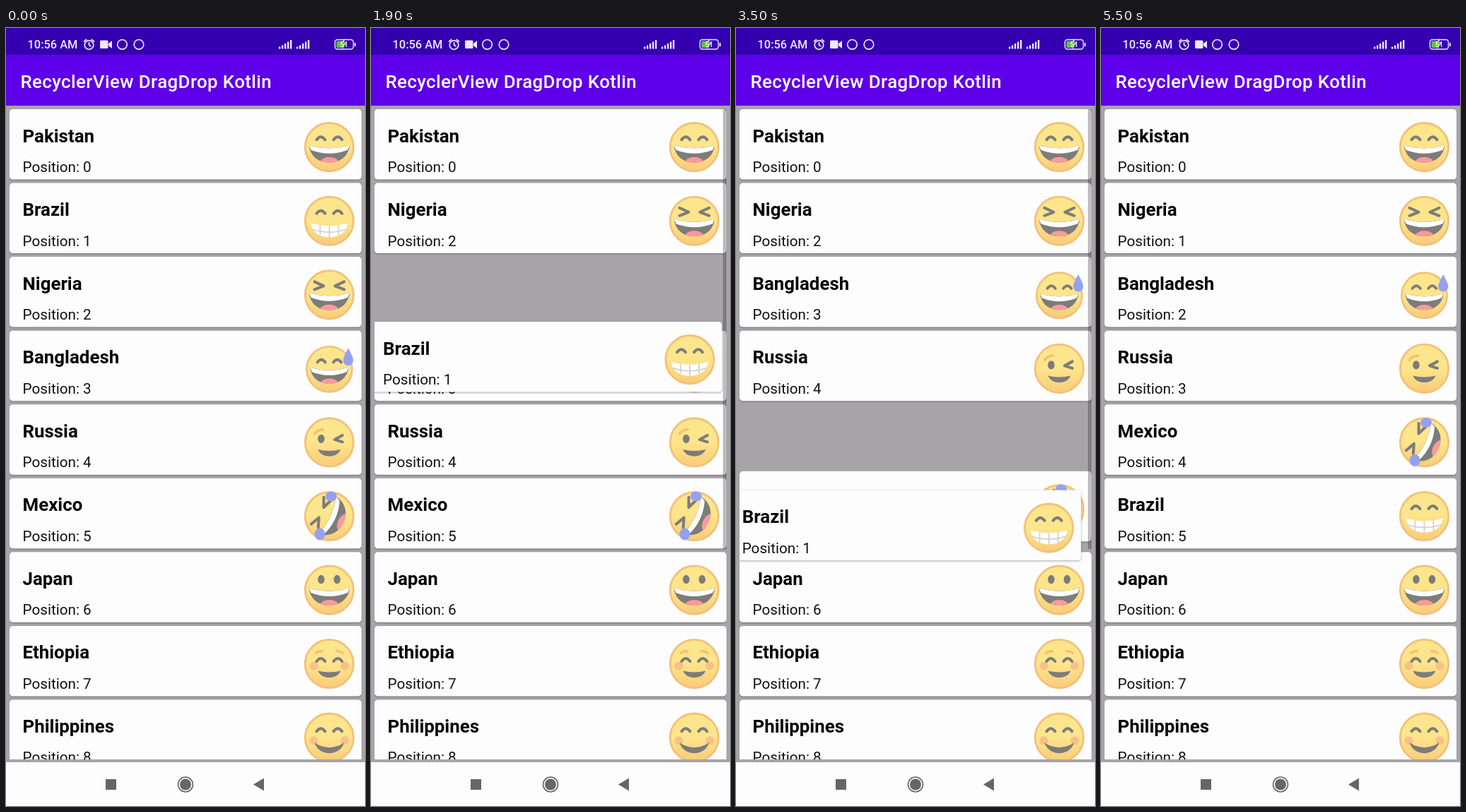
These frames come from a looping animation (508 by 1102 pixels, 5600 ms). An HTML page:

```html
<!DOCTYPE html>
<html lang="en">
<head>
<meta charset="utf-8">
<title>Drag and drop list</title>
<style>
  html, body { margin: 0; width: 100%; height: 100%; overflow: hidden; background: #fefdfe; }
  svg { display: block; width: 100%; height: 100%; font-family: Roboto, "Noto Sans", sans-serif; }
  .bar { font-size: 25.86px; font-weight: 500; letter-spacing: .4px; fill: #fff; }
  .clock { font-size: 16.4px; font-weight: 500; fill: #efe8fa; }
  .name { font-size: 25.86px; font-weight: 700; fill: #050505; }
  .pos { font-size: 20.7px; fill: #111; }
  .card { fill: #fefdfe; filter: drop-shadow(0 1px 1px rgba(0, 0, 0, .3)); }
  .held .card { filter: drop-shadow(0 1.5px 1.5px rgba(0, 0, 0, .35)); }
  .ink { fill: #7d7c7b; }
  .line { fill: none; stroke: #7d7c7b; stroke-width: 4; stroke-linecap: round; stroke-linejoin: round; }
  .brow { fill: none; stroke: #f5bf75; stroke-width: 3.5; stroke-linecap: round; }
  .blush { fill: #f8b48a; opacity: .75; }
  .tear { fill: #93a1f3; }
</style>
</head>
<body>
<svg viewBox="0 0 508 1102" preserveAspectRatio="none">
  <defs>
    <linearGradient id="skin" x2="0" y2="1">
      <stop offset=".5" stop-color="#fde58b"/>
      <stop offset="1" stop-color="#f9cb79"/>
    </linearGradient>
    <clipPath id="list"><rect x="5" y="111" width="498" height="925"/></clipPath>
    <clipPath id="mouth"><path d="M-29-3Q0 6 29-3C27 14 14 22 0 22S-27 14-29-3Z"/></clipPath>

    <circle id="face" r="34.2" fill="url(#skin)" stroke="#f4c07a" stroke-width="2.8"/>
    <g id="laugh" clip-path="url(#mouth)">
      <rect class="ink" x="-30" y="-4" width="60" height="27"/>
      <path d="M-29-3Q0 6 29-3L26 4Q0 14-26 4Z" fill="#fff"/>
      <ellipse cy="21.5" rx="13" ry="7.5" fill="#f99a9c"/>
    </g>
    <path id="happy" class="line" d="M-18-10.5q6-8 12 0M6-10.5q6-8 12 0"/>
    <path id="squint" class="line" d="M-21-18.5L-8-12.5L-21-7.5M21-18.5L8-12.5L21-7.5"/>
    <path id="smirk" class="ink" d="M-16 10Q0 14 16 10C13 17 7 19.5 0 19.5S-13 17-16 10Z"/>
    <path id="drop" class="tear" d="M0-14C3-7 7.5-1 7.5 5a7.5 7.5 0 0 1-15 0C-7.5-1-3-7 0-14Z"/>
  </defs>

  <rect width="508" height="38" fill="#3500b0"/>
  <rect y="38" width="508" height="72" fill="#5e00e9"/>
  <rect y="110" width="508" height="930" fill="#a6a4a7"/>

  <text class="clock" x="30.5" y="29">10:56 AM</text>
  <g fill="none" stroke="#efe8fa" stroke-width="1.7">
    <circle cx="117.5" cy="24" r="6.3"/>
    <path d="M117.5 20v4l3 2M110 19.5l4-3.5M125 19.5l-4-3.5"/>
    <circle cx="164.5" cy="23.3" r="6.8"/>
    <circle cx="188" cy="23.3" r="6.8"/>
    <rect x="465.5" y="16.5" width="26" height="13.5" rx="3.5" stroke-width="1.4"/>
  </g>
  <g fill="#efe8fa">
    <rect x="133" y="17.5" width="11.5" height="11.5" rx="1.5"/>
    <path d="M145 22l5-4v11l-5-4Z"/>
    <path id="signal" d="M386 29.5v-3h2.4v3zM390 29.5v-5h2.4v5zM394 29.5v-7.500h2.400v7.500zM398 29.500v-10h2.400v10zM402 29.500v-12.500h2.400v12.500z"/>
    <use href="#signal" x="25"/>
    <path d="M493 21h1.800v5h-1.800zM478.500 16l-5.500 8h3.600l-1.300 6.500l6-8.500h-3.800l2.200-6Z" transform="translate(0 0)" visibility="hidden"/>
    <rect x="493" y="21" width="1.8" height="5"/>
    <path d="M478.500 15.500l-5 8.500h3.300l-1.300 6.500l6-9h-3.600l1.600-6Z"/>
  </g>
  <rect x="467.500" y="18.500" width="11.500" height="9.500" rx="1.500" fill="#5fc33c"/>
  <text x="478.500" y="27" font-size="10" font-weight="500" text-anchor="middle" fill="#fff">51</text>
  <text class="bar" x="20.500" y="84.500">RecyclerView DragDrop Kotlin</text>

  <g clip-path="url(#list)">
    <g id="rows"></g>
    <rect id="thumb" x="498" y="115" width="5" height="623" fill="#000"/>
  </g>

  <rect y="1040" width="508" height="62" fill="#fefdfe"/>
  <g fill="#666">
    <rect x="141" y="1064" width="15" height="15"/>
    <circle cx="254" cy="1071.500" r="8"/>
    <circle cx="254" cy="1071.500" r="10.500" fill="none" stroke="#666" stroke-width="1.600"/>
    <path d="M350 1071.500L365 1062.500V1080.500Z"/>
  </g>
</svg>
<script>
const LOOP = 5600, STEP = 100, TOP = 115, PITCH = 104.56;
const HELD = 1, MOVE = 250, DROPPED = 4700;
const swaps = [1200, 2000, 2700, 3450]; // times at which rows 2 to 5 give way
const drag = [ // time, x offset, top
  [350, 0, TOP + PITCH], [900, -1.6, 293], [1900, -6.4, 416], [2800, -12, 553],
  [3500, -14.8, 654.5], [3750, -15, 660], [4330, -15, 646], [4580, 0, TOP + 5 * PITCH]
];

const use = id => `<use href="#${id}"/>`;
const eye = (x, y) => `<ellipse class="ink" cx="${x}" cy="${y}" rx="4.800" ry="6.200"/>`;
const blush = y => [-22, 22].map(x => `<circle class="blush" cx="${x}" cy="${y}" r="6"/>`).join('');
const shift = (dx, dy, part) => `<g transform="translate(${dx} ${dy})">${part}</g>`;

const teeth = `<path d="M-26 3Q0 11 26 3C25 16 14 23 0 23S-25 16-26 3Z" fill="#fff"/>
  <path d="M-24 12Q0 20 24 12M-13 6V20M0 7V23M13 6V20" fill="none" stroke="#d3d0cd" stroke-width="1.800"/>`;
const wink = '<path class="line" d="M18.500-10L7.500-4L18.500-.5"/><path class="brow" d="M-21-12Q-17-18-9-18.500"/>';
const brows = '<path class="brow" d="M-19-15Q-16-18-10-18M19-15Q16-18 10-18"/>';
const smile = '<path class="ink" d="M-21 7Q0 21 21 7C18 17 9 22 0 22S-18 17-21 7Z"/>';
const rolling = `<g transform="rotate(-65)">${use('laugh') + use('squint')}</g>
  <ellipse class="tear" cx="2.500" cy="-28" rx="8" ry="7"/>
  <ellipse class="tear" cx="-13.500" cy="25.500" rx="7.500" ry="8.500"/>`;

const items = [
  ['Pakistan', use('happy') + use('laugh')],
  ['Brazil', use('happy') + teeth],
  ['Nigeria', use('squint') + use('laugh')],
  ['Bangladesh', use('happy') + use('laugh') + shift(28.5, -18, use('drop'))],
  ['Russia', eye(-11.5, -5) + wink + use('smirk')],
  ['Mexico', rolling],
  ['Japan', eye(-11.5, -15) + eye(11, -15) + use('laugh')],
  ['Ethiopia', blush(3) + brows + shift(0, 7, use('happy')) + use('smirk')],
  ['Philippines', blush(4) + shift(0, 1.5, use('happy')) + smile]
];

const list = document.getElementById('rows');
const thumb = document.getElementById('thumb');
const rows = items.map(([name, parts], i) => {
  const row = document.createElementNS('http://www.w3.org/2000/svg', 'g');
  const fit = name === 'Bangladesh' ? ' translate(0 1) scale(.94)' : '';
  row.innerHTML = `<rect class="card" x="5" width="498" height="99.500" rx="4.500"/>
    <text class="name" x="23.500" y="46.500">${name}</text>
    <text class="pos" x="23.500" y="89">Position: ${i}</text>
    <g transform="translate(457.500 53.700)${fit}">${use('face') + parts}</g>`;
  list.append(row);
  return row;
});
list.append(rows[HELD]);
const labels = rows.map(row => row.querySelector('.pos'));

const clamp = v => Math.min(1, Math.max(0, v));
const ease = v => (1 - Math.cos(Math.PI * clamp(v))) / 2;
const place = (row, x, y) => row.setAttribute('transform', `translate(${x.toFixed(2)} ${y.toFixed(2)})`);

function heldAt(t) {
  const next = drag.findIndex(k => k[0] > t);
  if (next === 0) return drag[0].slice(1);
  if (next < 0) return drag[drag.length - 1].slice(1);
  const a = drag[next - 1], b = drag[next];
  let p = (t - a[0]) / (b[0] - a[0]);
  if (next === drag.length - 1) p = ease(p);
  return [1, 2].map(i => a[i] + (b[i] - a[i]) * p);
}

function draw(now) {
  const t = Math.floor(now % LOOP / STEP) * STEP;
  const dropped = t >= DROPPED;
  rows.forEach((row, i) => {
    const swap = swaps[i - 2];
    let slot = i;
    if (i === HELD) {
      place(row, ...heldAt(t));
      row.classList.toggle('held', t >= drag[0][0] && !dropped);
      if (dropped) slot = HELD + swaps.length;
    } else {
      const up = swap ? ease((t - swap) / MOVE) : 0;
      place(row, 0, TOP + PITCH * (i - up));
      if (swap && dropped) slot = i - 1;
    }
    labels[i].textContent = 'Position: ' + slot;
  });
  const shown = t < swaps[0] ? 0 : 1 - clamp((t - DROPPED - 300) / 250);
  thumb.setAttribute('opacity', .25 * shown);
  requestAnimationFrame(draw);
}
draw(performance.now());
</script>
</body>
</html>
```
